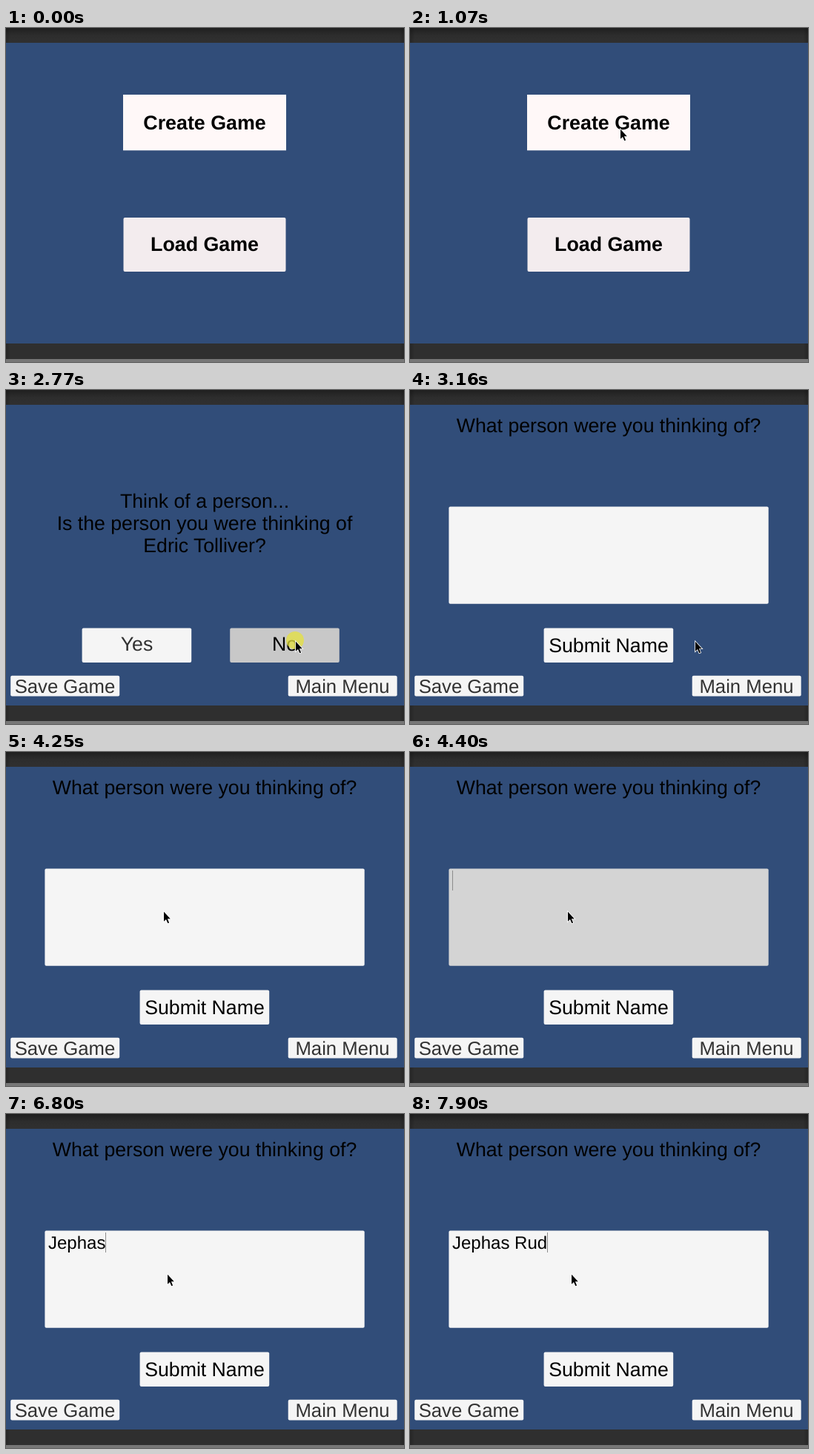
An HTML page for the animation above (8 s loop, 537 by 451 pixels).

```html
<!DOCTYPE html>
<html lang="en">
<head>
<meta charset="utf-8">
<title>Guess the person</title>
<style>
  html, body { margin: 0; width: 100%; height: 100%; overflow: hidden; background: #314d79; }
  svg { display: block; width: 537px; height: 451px; }
  text { font: 26.67px "Liberation Sans", Arial, sans-serif; text-anchor: middle; text-rendering: geometricPrecision; }
  .bold { font-weight: bold; font-size: 26.8px; }
  .soft { fill: #323232; }
  .small { font-size: 25.7px; }
  .btn { fill: #f5f5f5; }
  #typed { font-size: 24px; text-anchor: start; white-space: pre; }
</style>
</head>
<body>
<svg viewBox="0 0 537 451">
  <defs>
    <linearGradient id="top" x2="0" y2="1">
      <stop offset="0" stop-color="#1f1f1f"/>
      <stop offset=".5" stop-color="#2d2d2d"/>
      <stop offset="1" stop-color="#303030"/>
    </linearGradient>
    <linearGradient id="side">
      <stop offset="0" stop-opacity=".2"/>
      <stop offset=".012" stop-opacity="0"/>
      <stop offset=".988" stop-opacity="0"/>
      <stop offset="1" stop-opacity=".2"/>
    </linearGradient>
  </defs>
  <rect width="537" height="451" fill="#314d79"/>
  <rect width="537" height="20" fill="url(#top)"/>
  <rect y="426" width="537" height="21" fill="#2f2f2f"/>
  <rect width="537" height="20" fill="url(#side)"/>
  <rect y="426" width="537" height="21" fill="url(#side)"/>
  <rect y="447" width="537" height="4" fill="#777"/>

  <g id="menu">
    <rect x="158" y="90" width="220" height="75.3" fill="#fff8f8"/>
    <text class="bold" x="268" y="137">Create Game</text>
    <rect x="158.5" y="256" width="219" height="73" rx="2" fill="#f3ecee"/>
    <text class="bold" x="268" y="301">Load Game</text>
  </g>

  <g id="guess">
    <text x="268" y="159">Think of a person...</text>
    <text x="268" y="189">Is the person you were thinking of</text>
    <text x="268" y="219">Edric Tolliver?</text>
    <rect class="btn" x="102.6" y="321.6" width="147.6" height="46.4" rx="2"/>
    <text class="soft" x="176.5" y="352">Yes</text>
    <rect class="btn" id="no" x="302.2" y="321.6" width="147.6" height="46.4" rx="2"/>
    <text x="376" y="352">No</text>
  </g>

  <g id="ask">
    <text x="268" y="57">What person were you thinking of?</text>
    <rect class="btn" id="field" x="52.4" y="157.4" width="431.3" height="131.3" rx="2"/>
    <text id="typed" x="57" y="182" xml:space="preserve"></text>
    <rect id="caret" y="160" width="1" height="27" fill="#8c8c8c"/>
    <rect class="btn" x="180.6" y="321.6" width="174.6" height="46.4" rx="2"/>
    <text x="268" y="354">Submit Name</text>
  </g>

  <g id="bar">
    <rect class="btn" x="6.2" y="385.8" width="147" height="27.6" rx="2"/>
    <text class="soft small" x="79.5" y="408.5">Save Game</text>
    <rect class="btn" x="380.7" y="385.8" width="147" height="27.6" rx="2"/>
    <text class="soft small" x="454" y="408.5">Main Menu</text>
  </g>

  <circle id="click" r="12" fill="#e6e23c" fill-opacity=".75"/>
  <path id="cursor" d="M1 1.8V14.8L4 12L6.3 17.3L8.1 16.5L5.9 11.3H9.8Z" stroke="#fff" stroke-width="1.6" paint-order="stroke"/>
</svg>
<script>
const LOOP = 8000;
const STEP = 77; // pointer refresh
const el = id => document.getElementById(id);
const show = (id, on) => el(id).setAttribute('visibility', on ? 'visible' : 'hidden');
const within = (t, from, to) => t >= from && t < to;
const ease = p => p * p * (3 - 2 * p);

// Pointer moves: first step, last step, and where it comes to rest
const home = [375, 354];
const moves = [
  { from: 230, to: 300, at: [375, 364] },
  { from: 530, to: 530, at: [375, 383] },
  { from: 610, to: 1070, at: [283, 135] },
  { from: 1850, to: 2390, at: [390, 338] },
  { from: 3080, to: 3160, at: [384, 338] },
  { from: 3470, to: 3630, at: [206, 44] },
  { from: 3790, to: 4250, at: [212, 214] },
  { from: 4480, to: 4480, at: [217, 215] }
];

function pointer(t) {
  const i = moves.filter(m => t >= m.from).length - 1;
  if (i < 0) return null;
  const { from, to, at } = moves[i];
  const start = i ? moves[i - 1].at : home;
  const steps = Math.round((to - from) / STEP) + 1;
  const done = t >= to ? steps : Math.floor((t - from) / STEP + 0.1) + 1;
  const p = ease(Math.min(1, done / steps));
  return start.map((v, k) => Math.round(v + (at[k] - v) * p));
}

const clicks = [[1230, 1390], [2700, 2850], [4330, 4400]];
const name = 'Jephas Rud';
const keys = [5560, 5720, 5950, 6330, 6500, 6800, 7030, 7430, 7750, 7900];

// Running text width for each number of typed letters
const typed = el('typed');
typed.textContent = name;
const widths = [0, ...keys.map((_, i) => typed.getSubStringLength(0, i + 1))];

function draw(t) {
  show('menu', t < 1540);
  show('guess', within(t, 1540, 2850));
  show('ask', t >= 2850);
  show('bar', t >= 1540);

  el('no').style.fill = within(t, 2700, 2850) ? '#c8c8c8' : '';
  el('field').style.fill = within(t, 4330, 4400) ? '#c8c8c8' : within(t, 4400, 4480) ? '#d4d4d4' : '';

  const count = keys.filter(k => t >= k).length;
  typed.textContent = name.slice(0, count);
  el('caret').setAttribute('x', Math.round(57 + widths[count]));
  show('caret', within(t, 4330, 4860) || t >= 5490);

  const spot = pointer(t);
  show('cursor', spot);
  show('click', clicks.some(([a, b]) => within(t, a, b)));
  if (spot) {
    const place = `translate(${spot})`;
    el('cursor').setAttribute('transform', place);
    el('click').setAttribute('transform', place);
  }
}

const start = performance.now();
function tick() {
  draw((performance.now() - start) % LOOP);
  requestAnimationFrame(tick);
}
tick();
</script>
</body>
</html>
```
